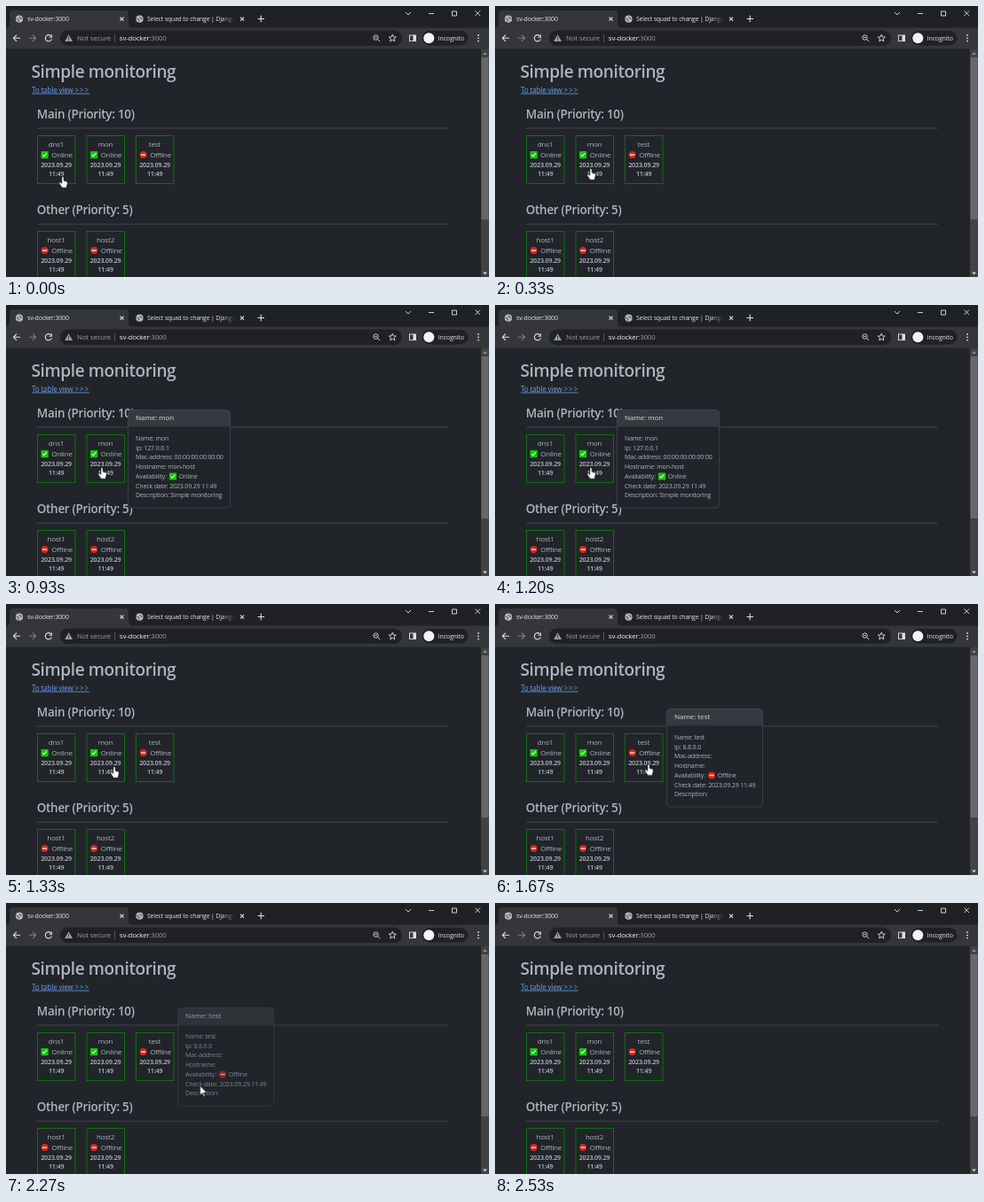
An HTML page that plays this animation: 544x306 px, repeating every 2590 ms.

```html
<!DOCTYPE html>
<html lang="en">
<head>
<meta charset="utf-8">
<title>Simple monitoring</title>
<style>
html, body { margin: 0; width: 100%; height: 100%; overflow: hidden; background: #212529; }
svg { display: block; width: 544px; height: 306px; }
text {
  font: 400 8px "Open Sans", "Noto Sans", sans-serif;
  letter-spacing: -.02em;
  fill: #adb5bd;
  white-space: pre;
}
.line { fill: none; stroke: #dee1e6; stroke-width: 1.1; }
.dim { stroke: #7d8084; }
.thin { stroke-width: .9; }
text.tab { font-size: 6.95px; font-weight: 500; fill: #e4e6ea; }
text.url { font-size: 7.85px; fill: #9aa0a6; }
.url .host { fill: #f1f3f4; }
text.h1 { font-size: 19px; font-weight: 600; }
text.h3 { font-size: 13.45px; font-weight: 600; }
text.link { font-size: 8.1px; fill: #6a9fec; text-decoration: underline .6px; }
.link .more { letter-spacing: .1em; }
text.mid { text-anchor: middle; }
text.date { font-size: 7.1px; font-weight: 600; fill: #bcc3ca; }
text.head { font-size: 7.9px; font-weight: 600; }
text.row { font-size: 7.03px; }

.mon, .test, .cursor, .hand, .arrow { animation: 2590ms infinite step-end; }
.mon { animation-name: mon; }
.test { animation-name: test; }
.cursor { animation-name: move; }
.hand { animation-name: hand; }
.arrow { animation-name: arrow; }

@keyframes mon {
  0% { opacity: 0; }
  15.058% { opacity: 0; animation-timing-function: steps(3, jump-start); }
  22.78% { opacity: 1; }
  48.649% { opacity: 1; animation-timing-function: steps(2, jump-start); }
  53.668%, 100% { opacity: 0; }
}
@keyframes test {
  0% { opacity: 0; }
  58.803% { opacity: 0; animation-timing-function: steps(3, jump-start); }
  66.448% { opacity: 1; }
  87.259% { opacity: 1; animation-timing-function: steps(3, jump-start); }
  94.942%, 100% { opacity: 0; }
}
@keyframes move {
  0% { transform: translate(64px, 192.2px); }
  2.317% { transform: translate(64px, 192.2px); animation-timing-function: steps(5, jump-start); }
  15.058% { transform: translate(108px, 183.3px); }
  48.649% { transform: translate(108px, 183.3px); animation-timing-function: steps(2, jump-start); }
  53.668% { transform: translate(122px, 183.3px); animation-timing-function: steps(4, jump-start); }
  63.9% { transform: translate(173px, 180.5px); }
  87.259% { transform: translate(173px, 180.5px); animation-timing-function: steps(4, jump-start); }
  97.49%, 100% { transform: translate(355px, 283px); }
}
@keyframes hand {
  0%, 7.413%, 56.226% { opacity: 1; }
  4.865%, 53.668%, 87.259%, 100% { opacity: 0; }
}
@keyframes arrow {
  0%, 7.413%, 56.226%, 97.49%, 100% { opacity: 0; }
  4.865%, 53.668%, 87.259% { opacity: 1; }
}
</style>
</head>
<body>
<svg viewBox="0 0 544 306">
  <defs>
    <linearGradient id="fade">
      <stop offset="0" stop-color="#202124" stop-opacity="0"/>
      <stop offset="1" stop-color="#202124"/>
    </linearGradient>
    <g id="globe">
      <circle r="4.1" fill="#b4b8bd"/>
      <path d="M-3.2-.6L-.6.6-.9 2.8M.4-2.6L.9-1 3-.4" fill="none" stroke="#45484d" stroke-width="1"/>
    </g>
    <path id="close" class="line" d="M-2-2L2 2M2-2L-2 2"/>
    <g id="on">
      <rect x="-4.1" y="-4.1" width="8.2" height="8.2" rx=".6" fill="#16c60c"/>
      <path d="M-2.3 .1L-.8 1.7 2.4-2" fill="none" stroke="#e9f9e8" stroke-width="1.1"/>
    </g>
    <g id="off">
      <circle r="4" fill="#d9261c"/>
      <rect x="-2.6" y="-.7" width="5.2" height="1.4" fill="#f6e4e2"/>
    </g>
  </defs>

  <rect width="544" height="306" fill="#212529"/>

  <!-- tab strip -->
  <rect width="544" height="25" fill="#202124"/>
  <path d="M0 24.5Q4 24.5 4 20V9Q4 5 8 5H134Q138 5 138 9V20Q138 24.5 142 24.5H544V48.5H0Z" fill="#35363a"/>
  <use href="#globe" x="15" y="14.7"/>
  <text class="tab" x="24" y="17.3">sv-docker:3000</text>
  <use href="#close" x="130.5" y="14.7"/>
  <use href="#globe" x="150.5" y="14.7"/>
  <svg x="159" y="5" width="99" height="19">
    <text class="tab" style="font-size:6.85px" y="12.3">Select squad to change | Django</text>
    <rect x="84" width="15" height="19" fill="url(#fade)"/>
  </svg>
  <use href="#close" x="266" y="14.7"/>
  <path class="line" d="M283.5 14.5H291M287.2 10.8V18.2"/>
  <path class="line thin" d="M450 7L453 10 456 7M476 8.5H482M502.5 6H507.5V11H502.5ZM528.5 5.5L534 11M534 5.5L528.5 11"/>

  <!-- toolbar -->
  <path class="line" d="M16 36.3H8.5M12 32.7L8.4 36.3 12 39.9"/>
  <path class="line dim" d="M26 36.3H33.5M30 32.7L33.6 36.3 30 39.9"/>
  <path class="line" d="M50.6 33.8A3.6 3.6 0 1 0 51.4 37.3M51.4 32.4V35.2H48.6"/>
  <rect x="61" y="27.5" width="385" height="17.5" rx="8.75" fill="#202124"/>
  <path d="M70.6 32.2L75 40H66.2Z" fill="#9aa0a6"/>
  <path d="M70.6 34.8V37.2M70.6 38V39" stroke="#202124" stroke-width=".9"/>
  <text class="url" x="80" y="39.2">Not secure</text>
  <path d="M122.5 32V41" stroke="#5f6368" stroke-width=".8"/>
  <text class="url" x="127.8" y="39.2"><tspan class="host">sv-docker</tspan>:3000</text>
  <g class="line thin">
    <circle cx="416.6" cy="35.6" r="2.7"/>
    <path d="M418.6 37.6L421.2 40.2M415.3 35.6H417.9"/>
    <path d="M435.3 32.2L436.4 34.9 439.3 35.1 437.1 37 437.8 39.9 435.3 38.3 432.8 39.9 433.5 37 431.3 35.1 434.2 34.9Z"/>
    <rect x="454.5" y="33" width="7" height="6.6"/>
  </g>
  <rect x="458.5" y="33" width="3.2" height="6.6" fill="#dee1e6"/>
  <rect x="468.5" y="28" width="52" height="16.5" rx="8.25" fill="#202124"/>
  <circle cx="476.3" cy="36.2" r="6" fill="#f1f3f4"/>
  <text class="tab" x="486.8" y="38.8">Incognito</text>
  <g fill="#dee1e6">
    <circle cx="532" cy="33" r=".9"/><circle cx="532" cy="36.3" r=".9"/><circle cx="532" cy="39.6" r=".9"/>
  </g>

  <!-- scrollbar -->
  <rect x="535" y="48.5" width="9" height="257.5" fill="#424242"/>
  <rect x="535.5" y="58" width="8" height="183" fill="#686868"/>
  <path d="M537 55L539.5 52 542 55Z" fill="#8b8b8b"/>
  <path d="M537 300.5L539.5 303.5 542 300.5Z" fill="#cdcdcd"/>

  <!-- page -->
  <text class="h1" x="28.5" y="80.7">Simple monitoring</text>
  <text class="link" x="29" y="97.6">To table view <tspan class="more">&gt;&gt;&gt;</tspan></text>
  <text class="h3" x="34.8" y="126.5">Main (Priority: 10)</text>
  <text class="h3" x="34.8" y="234.8">Other (Priority: 5)</text>
  <path d="M35 138H499M35 246.3H499" stroke="#43484c" stroke-width=".9"/>
  <g id="cards"></g>
  <g id="popups"></g>

  <g class="cursor" stroke="#000" stroke-width=".7" fill="#fff" stroke-linejoin="round">
    <path class="hand" d="M-1.2 1Q0-.8 1.2 1V5L4.3 5.8Q5.6 6.3 5.4 8L4.6 11V13H-1.6V11.8L-4.3 8Q-4.6 6.4-3 6.6L-1.2 8Z"/>
    <path class="arrow" d="M0 0V11L2.6 8.7 4.2 12.4 5.8 11.7 4.2 8.1H7.7Z"/>
  </g>
</svg>
<script>
const label = up => up ? 'Online' : 'Offline';
const icon = (up, x, y) => `<use href="#${up ? 'on' : 'off'}" x="${x}" y="${y}"/>`;

function card(name, up, col, row) {
  return `<g transform="translate(${35 + col * 55.5} ${146.5 + row * 108})">
    <rect x=".5" width="42.5" height="54" fill="none" stroke="#0e700e"/>
    <text class="mid" x="21.5" y="12.4">${name}</text>
    ${icon(up, 8.6, 21.6)}
    <text x="16.2" y="24.3">${label(up)}</text>
    <text class="mid date" x="21.6" y="35.8">2023.09.29</text>
    <text class="mid date" x="21.6" y="45.1">11:49</text>
  </g>`;
}

function popup(name, up, x, width, ip, mac, host, about) {
  const rows = [`Name: ${name}`, `Ip: ${ip}`, `Mac-address: ${mac}`, `Hostname: ${host}`,
    'Availability:', 'Check date: 2023.09.29 11:49', `Description: ${about}`];
  const lines = rows.map((s, i) => `<text class="row" x="8.5" y="${34.3 + i * 10.75}">${s}</text>`);
  return `<g class="${name}"><g transform="translate(${x} 118.5)">
    <rect width="${width}" height="110.5" rx="4" fill="#212529"/>
    <path d="M0 19V4Q0 0 4 0H${width - 4}Q${width} 0 ${width} 4V19Z" fill="#343a3f"/>
    <rect width="${width}" height="110.5" rx="4" fill="none" stroke="#42474c" stroke-width=".8"/>
    <text class="head" x="8.5" y="11.8">Name: ${name}</text>
    ${lines.join('')}
    ${icon(up, 50.5, 75)}
    <text class="row" x="57.3" y="77.3">${label(up)}</text>
  </g></g>`;
}

document.getElementById('cards').innerHTML =
  card('dns1', true, 0, 0) + card('mon', true, 1, 0) + card('test', false, 2, 0) +
  card('host1', false, 0, 1) + card('host2', false, 1, 1);

document.getElementById('popups').innerHTML =
  popup('mon', true, 137.5, 115, '127.0.0.1', '00:00:00:00:00:00', 'mon-host', 'Simple monitoring') +
  popup('test', false, 193.5, 108, '8.8.0.0', '', '', '');
</script>
</body>
</html>
```
